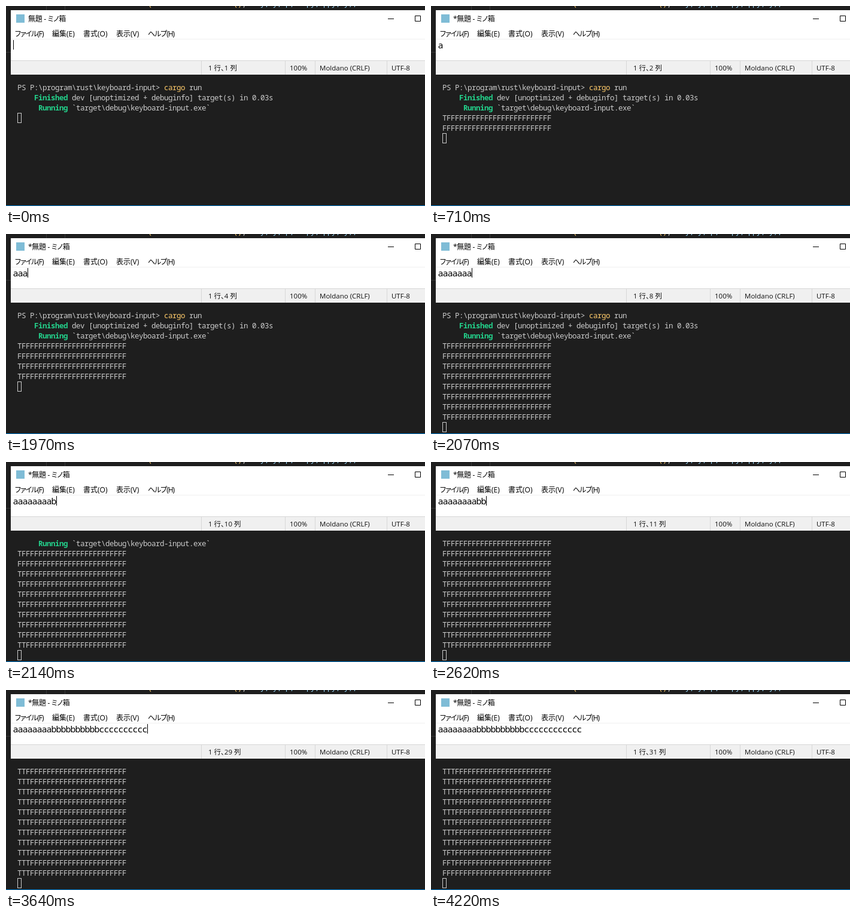
Write an HTML page that moves like this. It is 700 px wide and 335 px high and loops after 4560 ms.

```html
<!DOCTYPE html>
<html lang="ja">
<head>
<meta charset="utf-8">
<style>
html, body { margin: 0; width: 100%; height: 100%; overflow: hidden; background: #1e1e1e; }
svg { display: block; width: 700px; height: 335px; }
text { white-space: pre; }
.ui { font: 12px 'Open Sans', 'Noto Sans CJK JP', sans-serif; font-feature-settings: 'palt'; }
.kana { letter-spacing: -1.05px; }
.status { font-size: 11.5px; fill: #111; }
#title { letter-spacing: -.3px; }
#note { font: 300 15px 'Noto Sans Mono', monospace; letter-spacing: -1px; }
.mono { font: 500 12.5px 'Noto Sans Mono', monospace; letter-spacing: -.5px; fill: #ccc; }
.ok { fill: #23d18b; font-weight: 700; }
.cmd { fill: #ffcb6b; }
.var { fill: #9cdcfe; }
</style>
</head>
<body>
<svg viewBox="0 0 700 335">
  <rect width="700" height="335" fill="#1e1e1e"/>
  <path d="M67.5 0V7M98.5 0V7M0 77.5H8" stroke="#383838"/>
  <g class="mono">
    <text class="cmd" x="237" y="1">(</text>
    <text class="cmd" x="380" y="1">()<tspan fill="#ccc">;</tspan></text>
    <text class="var" x="411" y="0">key, y, p, copy, ppy, y);</text>
  </g>
  <path d="M0 334.5H700" stroke="#007acc"/>

  <rect x="8" y="7" width="692" height="108" fill="#fff"/>
  <path d="M8 55.5H700" stroke="#f0f0f0"/>
  <rect x="8" y="91" width="692" height="24" fill="#f0f0f0"/>
  <path d="M8 91.5H700M326.5 92V115M466.5 92V115M516.5 92V115M636.5 92V115" stroke="#d7d7d7"/>
  <rect x="17" y="14" width="14" height="14" fill="#7fbcd6"/>
  <path d="M638 21.5H648M683.5 16.5H692.5V25.5H683.5Z" fill="none" stroke="#000"/>
  <g class="ui">
    <text id="title" x="37" y="26"></text>
    <text class="kana" x="15" y="51">ファイル(F)</text>
    <text x="77" y="51">編集(E)</text>
    <text x="129" y="51">書式(O)</text>
    <text x="184" y="51">表示(V)</text>
    <text class="kana" x="237" y="51">ヘルプ(H)</text>
    <text id="pos" class="status" x="338" y="108"></text>
    <text class="status" x="474" y="108">100%</text>
    <text class="status" x="524" y="108">Moldano (CRLF)</text>
    <text class="status" x="644" y="108">UTF-8</text>
  </g>
  <text id="note" x="11.5" y="71"></text>
  <rect id="caret" y="57" width="1" height="16"/>

  <g id="log" class="mono"></g>
  <rect id="cursor" x="19.5" width="6" height="16" fill="none" stroke="#ccc"/>
</svg>
<script>
const LOOP = 4560, MAX_LINES = 11;
const $ = id => document.getElementById(id);
const header = [
  'PS P:\\program\\rust\\keyboard-input&gt; <tspan class="cmd">cargo</tspan> run',
  '    <tspan class="ok">Finished</tspan> dev [unoptimized + debuginfo] target(s) in 0.03s',
  '     <tspan class="ok">Running</tspan> `target\\debug\\keyboard-input.exe`'
];

// Each event types a key (or none, on release) and logs the held-key flags.
const events = [];
const add = (at, key, flags) => events.push({ at, key, flags });
const repeat = (start, step, count, key, flags) => {
  for (let i = 0; i < count; i++) add(start + i * step, key, flags);
};
add(200, 'a', 'T');
add(300, '', 'F');
add(1440, 'a', 'T');
repeat(1950, 30, 6, 'a', 'T');
add(2140, 'b', 'TT');
repeat(2620, 30, 9, 'b', 'TT');
add(2900, 'c', 'TTT');
repeat(3410, 28.75, 9, 'c', 'TTT');
repeat(3690, 20, 2, 'c', 'TTT');
add(3790, '', 'TFT');
add(3830, '', 'FFT');
add(3870, '', 'FFF');

let shown = -1;

function showState(past) {
  const note = past.map(e => e.key).join('');
  const rows = past.map(e => e.flags.padEnd(26, 'F'));
  const lines = [...header, ...rows].slice(-MAX_LINES);
  $('title').textContent = (note && '*') + '無題 - ミノ箱';
  $('pos').textContent = `1 行、${note.length + 1} 列`;
  $('note').textContent = note;
  $('caret').setAttribute('x', 12 + 8 * note.length);
  $('log').innerHTML = lines
    .map((line, i) => `<text x="19" y="${141 + 17 * i}">${line}</text>`).join('');
  $('cursor').setAttribute('y', 128.5 + 17 * lines.length);
}

function draw() {
  const t = performance.now() % LOOP;
  const past = events.filter(e => e.at <= t);
  if (past.length !== shown) {
    shown = past.length;
    showState(past);
  }
  const lastKey = Math.max(0, ...past.filter(e => e.key).map(e => e.at));
  $('caret').style.opacity = (t - lastKey) % 1030 < 510 ? 1 : 0;
  requestAnimationFrame(draw);
}
draw();
</script>
</body>
</html>
```
